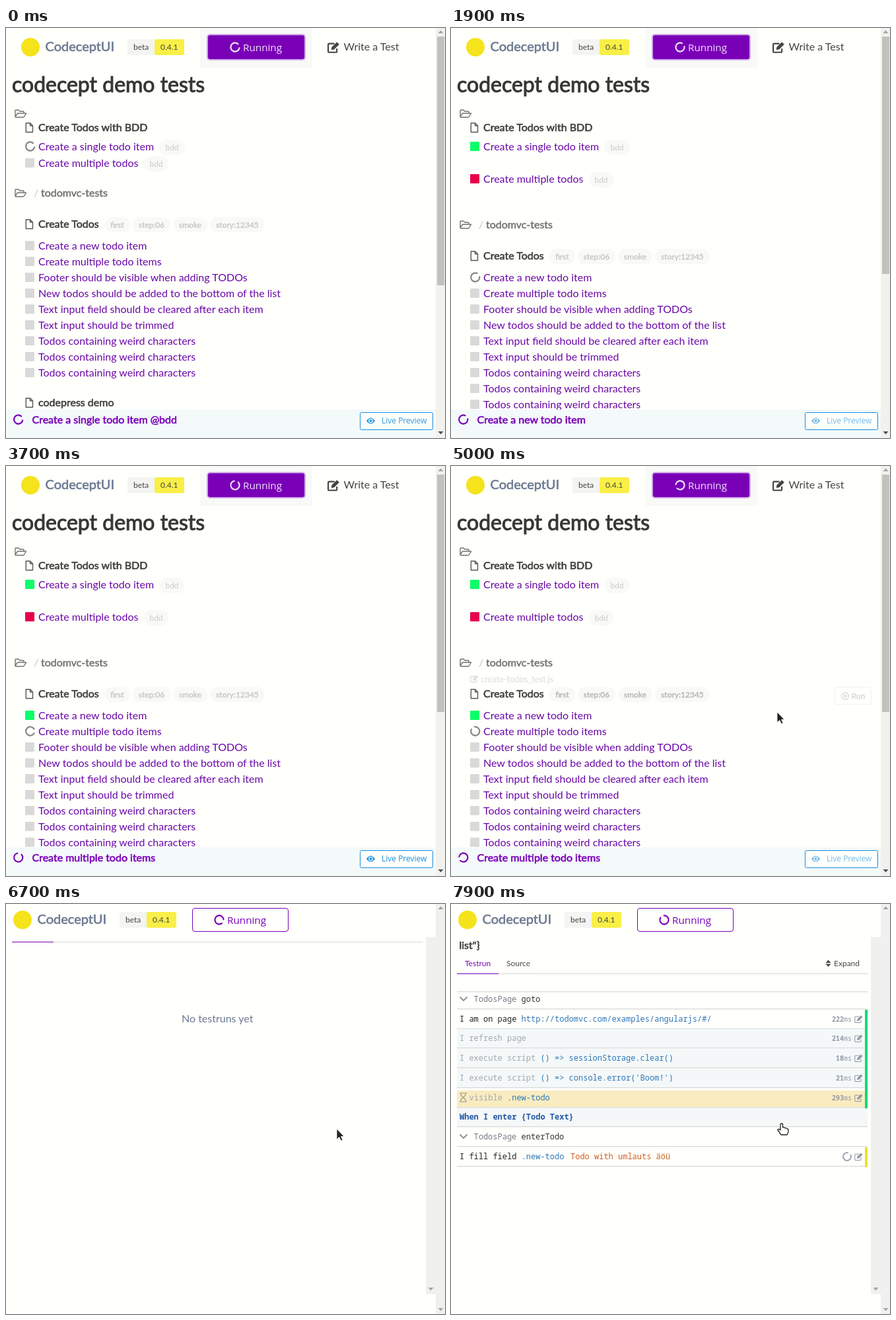
Write an HTML page that moves like this. It is 665 px wide and 620 px high and loops after 8 s.

```html
<!DOCTYPE html>
<html lang="en">
<head>
<meta charset="utf-8">
<title>Test runner</title>
<style>
html, body { margin: 0; width: 100%; height: 100%; overflow: hidden; background: #fffffc; }
svg { display: block; width: 665px; height: 620px; }
text { white-space: pre; }
</style>
</head>
<body>
<svg id="stage" viewBox="0 0 665 620" xmlns="http://www.w3.org/2000/svg"></svg>
<script>
const LOOP = 8000, TICK = 100;
const BG = '#fffffc', PURPLE = '#7a00b8', LINK = '#6a08a8', INK = '#3d3d3a', GREY = '#72726f';
const GREEN = '#0aff69', RED = '#e6004c', BLUE = '#148de2', MUTED = '#a2a9b3', CODE = '#2e77b8';
const LATO = "Lato, sans-serif", OPEN = "'Open Sans', sans-serif", MONO = "'Noto Sans Mono', monospace";

// Moments at which the state changes, in ms
const SINGLE_DONE = 1200, MULTI_DONE = 1600, NEW_DONE = 3200;
const CLICK = 5400, PREVIEW = 6100, HAND_BACK = 7700;

const clamp = v => Math.max(0, Math.min(1, v));

const rect = (x, y, w, h, fill, extra = '') =>
  `<rect x="${x}" y="${y}" width="${w}" height="${h}" fill="${fill}" ${extra}/>`;

const group = (x, y, body, extra = '') => `<g transform="translate(${x} ${y})" ${extra}>${body}</g>`;

const line = (d, color, width = 1.5, extra = '') =>
  `<path d="${d}" fill="none" stroke="${color}" stroke-width="${width}" stroke-linejoin="round" ${extra}/>`;

function text(x, y, str, fill = INK, size = 16, { font = LATO, heavy = 0, weight = 400, anchor = 'start' } = {}) {
  const stroke = heavy ? `stroke="${fill}" stroke-width="${heavy}"` : '';
  return `<text x="${x}" y="${y}" font-family="${font}" font-size="${size}" font-weight="${weight}" ` +
    `text-anchor="${anchor}" fill="${fill}" ${stroke}>${str}</text>`;
}

const mono = (x, y, str, fill, weight = 400) => text(x, y, str, fill, 12, { font: MONO, weight });

// Ring with a notch at the top when it starts, one turn in two seconds
function spinner(x, y, color, t, start, r = 6.6) {
  const sx = r * Math.sin(0.5), sy = -r * Math.cos(0.5);
  return `<g transform="translate(${x} ${y}) rotate(${(t - start) * 0.18})">` +
    line(`M${sx} ${sy}A${r} ${r} 0 1 1 ${-sx} ${sy}`, color, 2.2, 'stroke-linecap="round"') + '</g>';
}

const folder = (x, y) => group(x, y,
  line('M1 11V2Q1 1 2 1H6L8 3H13Q14 3 14 4V6M1 11L4.5 6H17.5L14.5 11Q14 12 13 12H2Q1 12 1 11', GREY, 1.4));

const file = (x, y) => group(x, y, line('M.8 .8H7L11 4.8V14.5H.8ZM7 .8V4.8H11', '#555552', 1.4));

const pencil = (x, y, color, scale, width = 2) => group(x, y,
  `<g transform="scale(${scale})">` +
  line('M10 3H2.5Q1 3 1 4.5V14Q1 15.5 2.5 15.5H12Q13.5 15.5 13.5 14V10', color, width) +
  `<path d="M6 8L13.5 .6L17 4L9.5 11.5L5.5 12Z" fill="${color}"/></g>`);

const eye = (x, y, color) => group(x, y,
  `<path d="M0 0Q6.5 -9 13 0Q6.5 9 0 0Z" fill="${color}"/>` +
  `<circle cx="6.5" r="2.7" fill="none" stroke="${BG}" stroke-width="1.2"/>`);

const chevron = (x, y) => line(`M${x} ${y}l5.5 5.5l5.5 -5.5`, '#8a8f98', 1.8);

const triangle = (x, y, dir, color) =>
  `<path d="M${x - 4} ${y - 2 * dir}h8l-4 ${4.5 * dir}Z" fill="${color}"/>`;

const pill = (x, w, y, str, color, heavy) =>
  rect(x, y, w, 23, '#f9f9f7', 'rx="11.5"') +
  text(x + w / 2, y + 16, str, color, 12, { heavy, anchor: 'middle' });

function brand(x, y) {
  return group(x, y,
    '<circle cx="14" cy="14" r="14" fill="#f5e31c"/>' +
    text(36.5, 20, 'CodeceptUI', '#6b7890', 20, { heavy: 0.6 }) +
    rect(161, 2, 42, 24, '#f4f4f2', 'rx="3"') + rect(202, 2, 45, 24, '#f9ef47', 'rx="3"') +
    text(170, 18, 'beta', '#444', 12) + text(211, 18, '0.4.1', '#444', 12));
}

function runButton(x, y, focused, t, start) {
  const ink = focused ? '#f0e2f8' : PURPLE;
  return (focused ? rect(x - 12, 0, 170, 60, '#f9f9f8') +
      rect(x - 1, y - 1, 148, 38, PURPLE, 'rx="4" stroke="#cfa9e6" stroke-width="2"')
    : rect(x + 0.5, y + 0.5, 145, 35, BG, `rx="3.5" stroke="${PURPLE}"`)) +
    spinner(x + 41, y + 18, ink, t, start) +
    text(x + 53, y + 24, 'Running', ink, 15.25, { font: OPEN });
}

function testRow(y, title, status, t, start) {
  const marks = { wait: '#d9d9d9', pass: GREEN, fail: RED };
  return (status === 'run' ? spinner(36.7, y, '#858585', t, start)
    : rect(29, y - 7, 14, 14, marks[status], 'rx="1"')) + text(49, y + 6, title, LINK);
}

function footer(t) {
  const title = t < SINGLE_DONE ? 'Create a single todo item @bdd'
    : t < MULTI_DONE ? 'Create multiple todos @bdd'
    : t < NEW_DONE ? 'Create a new todo item' : 'Create multiple todo items';
  const hover = t >= CLICK;
  const ink = hover ? '#fff' : BLUE;
  const pulse = 0.8 + 0.2 * Math.cos((t - 500) / 3000 * 2 * Math.PI);
  return rect(0, 577, 651, 43, '#f4f9fa') +
    spinner(18.7, 592, PURPLE, t, -400) +
    text(39.5, 598, title, PURPLE, 16, { heavy: 0.6 }) +
    rect(536.5, 581.5, 110, 26, hover ? BLUE : BG, `rx="2" stroke="${BLUE}"`) +
    `<g opacity="${pulse}">` + eye(546, 594, ink) +
    text(569, 598, 'Live Preview', ink, 12, { font: OPEN }) + '</g>';
}

function listPage(t) {
  const shift = t < SINGLE_DONE ? 0 : t < MULTI_DONE ? 24 : 48;
  const hover = Math.min(clamp((t - 4900) / 400), clamp((5500 - t) / 300));
  const tagInk = hover ? '#b4b4b2' : '#c6c6c4';
  const tests = ['Create a new todo item', 'Create multiple todo items',
    'Footer should be visible when adding TODOs', 'New todos should be added to the bottom of the list',
    'Text input field should be cleared after each item', 'Text input should be trimmed',
    ...Array(3).fill('Todos containing weird characters')];
  const state = i => i === 0 ? (t < MULTI_DONE ? 'wait' : t < NEW_DONE ? 'run' : 'pass')
    : i === 1 && t >= NEW_DONE ? 'run' : 'wait';
  const multiY = t < SINGLE_DONE ? 204 : 228;
  const multi = t < SINGLE_DONE ? 'wait' : t < MULTI_DONE ? 'run' : 'fail';

  const suite = folder(13, 243) + text(42, 255, '/', '#c4c4c2') +
    text(53, 255, 'todomvc-tests', GREY, 16, { heavy: 0.5 }) +
    file(29.5, 289) + text(49, 302, 'Create Todos', INK, 16, { heavy: 0.6 }) +
    [[149, 39, 'first'], [192, 57, 'step:06'], [253, 52, 'smoke'], [309, 83, 'story:12345']]
      .map(([x, w, s]) => pill(x, w, 286, s, tagInk, 0.4)).join('') +
    `<g opacity="${hover}">` + pencil(29, 268, '#777', 0.72) +
    text(45, 279, 'create-todos_test.js', '#777', 12.8) +
    rect(581.5, 286.5, 55, 26, BG, 'rx="2" stroke="#ccc"') +
    line('M602.5 300a5.3 5.3 0 1 1 -10.6 0a5.3 5.3 0 1 1 10.6 0M596 297.5l4 2.5l-4 2.5Z', '#666', 1.3) +
    text(606.5, 304, 'Run', '#555', 12, { heavy: 0.3 }) + '</g>' +
    tests.map((s, i) => testRow(329 + 24 * i, s, state(i), t, i ? NEW_DONE : MULTI_DONE)).join('') +
    file(29.5, 559) + text(49, 572, 'codepress demo', INK, 16, { heavy: 0.6 });

  return brand(23, 15) + runButton(306, 11, t < CLICK, t, -400) +
    pencil(487, 20.5, '#444', 1.05) + text(511.5, 34, 'Write a Test', '#444') +
    text(9, 97, 'codecept demo tests', '#363633', 32, { heavy: 1 }) +
    folder(13, 123) + file(29.5, 143) +
    text(49, 156, 'Create Todos with BDD', INK, 16, { heavy: 0.6 }) +
    testRow(179, 'Create a single todo item', t < SINGLE_DONE ? 'run' : 'pass', t, -400) +
    pill(232, 39, 169, 'bdd', '#cacac8') +
    testRow(multiY, 'Create multiple todos', multi, t, SINGLE_DONE) +
    pill(208.5, 38, multiY - 10, 'bdd', '#cacac8') +
    group(0, shift, suite) + footer(t) +
    rect(651, 0, 14, 620, '#f1f1ee') +
    rect(653, 13, 11, 376 - shift * 17 / 48, '#c1c1be') +
    triangle(658.5, 6, -1, '#a5a5a2') + triangle(658.5, 612, 1, '#505050');
}

const STEPS = [
  [174, 6900, 7100, [[13, 'I am on page', '#222'], [106.6, 'http://todomvc.com/examples/angularjs/#/', CODE]], 222],
  [203, 7100, 7300, [[13, 'I refresh page', MUTED]], 214],
  [233, 7300, 7300, [[13, 'I execute script', MUTED], [135.4, '() => sessionStorage.clear()', CODE]], 18],
  [263, 7300, 7400, [[13, 'I execute script', MUTED], [135.4, "() => console.error('Boom!')", CODE]], 21],
  [293, 7400, 7700, [[27.5, 'visible', MUTED], [85, '.new-todo', CODE]], 293],
  [382, 7700, LOOP, [[13, 'I fill field', '#222'], [106.6, '.new-todo', CODE], [181, 'Todo with umlauts äöü', '#cb6120']], 0],
];

const divider = y => rect(9, y, 622, 1, '#d9dbdb') + rect(9, y + 1, 622, 1, '#f3f3f1');

const metaStep = (y, name) => chevron(13.5, y - 3.5) + mono(34.5, y + 4, 'TodosPage', '#777b82') +
  mono(106.5, y + 4, name, '#333', 500) + divider(y + 14);

function step([y, start, end, parts, ms], i, t) {
  if (t < start) return '';
  const done = t >= end, slow = i === 4;
  const fill = slow ? '#faecc0' : i > 0 && i < 4 ? '#f4f8f8' : BG;
  return rect(9, y - (slow ? 11 : 14), 622, slow ? 25 : 28, fill) + divider(y + 14) +
    rect(627, y - 14, 4, 30, done ? '#14d873' : '#f0df2c') +
    (slow ? line(`M13 ${y - 7}h11M13 ${y + 6}h11M14.5 ${y - 7}c0 7 8 6 8 13M22.5 ${y - 7}c0 7 -8 6 -8 13`, '#999a92', 1.2) : '') +
    parts.map(([x, s, c]) => mono(x, y + 4, s, c)).join('') +
    (done ? text(607, y + 4, `<tspan font-weight="700">${ms}</tspan>ms`, '#9298a6', 10, { font: MONO, anchor: 'end' })
      : spinner(600, y, '#a3a8b8', t, start, 6)) +
    pencil(611, y - 6, '#9298a6', 0.74, 1.5);
}

function testrun(t) {
  if (t < 6900) {
    return rect(9, 57, 622, 1, '#dadad8') + rect(9, 57, 63, 1, PURPLE) +
      text(266, 179, 'No testruns yet', '#6b7890');
  }
  let out = text(12.5, 68, 'list"}', INK, 16, { heavy: 0.6 }) +
    rect(9, 105, 622, 1, '#d5d5d3') + rect(9, 105, 63, 1, PURPLE) +
    text(21, 94, 'Testrun', PURPLE, 12) + text(84, 94, 'Source', '#4a4a4a', 12) +
    triangle(571.5, 87, -1, '#4a4a4a') + triangle(571.5, 92.5, 1, '#4a4a4a') +
    text(580, 94, 'Expand', '#4a4a4a', 12) + divider(132) + metaStep(144, 'goto');
  if (t >= HAND_BACK) {
    out += rect(9, 309, 622, 27, '#f4f8f8') +
      mono(13, 326, 'When I enter {Todo Text}', '#2458a3', 700) + divider(336) + metaStep(352, 'enterTodo');
  }
  return out + STEPS.map((s, i) => step(s, i, t)).join('');
}

function previewPage(t) {
  return brand(11, 10) + runButton(282, 6, false, t, 6067) + testrun(t) +
    rect(636, 50, 15, 540, '#f0f0ee') + rect(651, 0, 14, 620, '#f0f0ee') +
    triangle(658.5, 6, -1, '#a3a3a1') +
    triangle(643.5, 582, 1, '#a3a3a1') + triangle(658.5, 613, 1, '#a3a3a1');
}

// Pointer path as [time, x, y]
const PATH = [[4800, 468, 300], [5000, 494, 372], [5300, 548, 565], [5400, 557, 590], [5600, 560, 600],
  [6150, 560, 600], [6300, 553, 553], [6700, 501, 340], [7500, 501, 340], [7700, 501, 332]];

function pointer(t) {
  if (t < PATH[0][0]) return '';
  const next = PATH.findIndex(p => p[0] > t);
  let [, x, y] = PATH[PATH.length - 1];
  if (next > 0) {
    const [t0, x0, y0] = PATH[next - 1], [t1, x1, y1] = PATH[next];
    const k = (t - t0) / (t1 - t0);
    x = x0 + (x1 - x0) * k;
    y = y0 + (y1 - y0) * k;
  }
  const hand = (t >= CLICK && t < PREVIEW) || t >= HAND_BACK;
  return group(x, y, hand
    ? '<path d="M-2 1Q0 -1 1.5 1V6Q4 5 5 7Q7 6 8 8Q10 8 10 10V13L8 17H-1L-6 10Q-6 8 -4 8.500L-2 10Z" fill="#fff" stroke="#222" stroke-width="1.3" stroke-linejoin="round"/>'
    : '<path d="M0 0V16L3.700 12.500L6.500 18L9 17L6.500 11.500H11Z" fill="#222" stroke="#fff" stroke-width=".8"/>');
}

const stage = document.getElementById('stage');
const origin = performance.now();
let shown = -1;

function draw() {
  const t = Math.floor((performance.now() - origin) % LOOP / TICK) * TICK;
  if (t !== shown) {
    shown = t;
    stage.innerHTML = rect(0, 0, 665, 620, BG) + (t < PREVIEW ? listPage(t) : previewPage(t)) + pointer(t);
  }
  requestAnimationFrame(draw);
}
draw();
</script>
</body>
</html>
```
